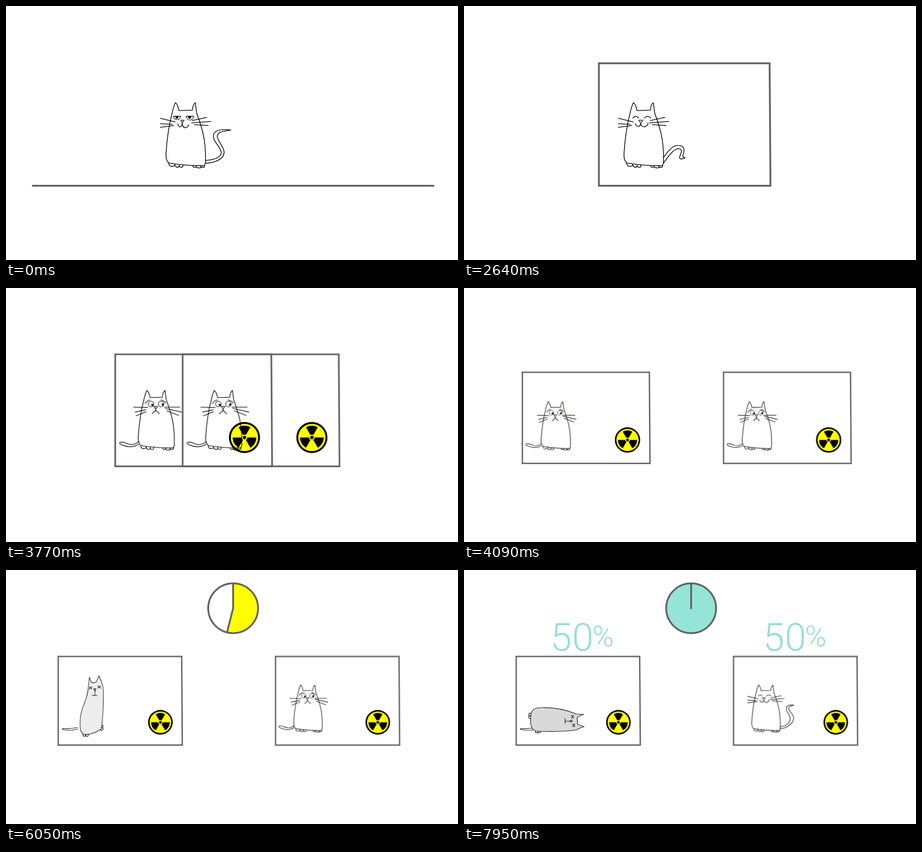
Animation of 997x561 px, one loop 8000 ms. Source, as an HTML page:

```html
<!DOCTYPE html>
<html lang="en">
<head>
<meta charset="utf-8">
<title>Cat in a box</title>
<style>
html, body { margin: 0; height: 100%; overflow: hidden; background: #fff; }
svg { display: block; width: 100%; height: 100%; }
svg * { animation: 0s linear infinite; animation-duration: 8s; }
svg { fill: none; stroke: #000; stroke-width: 1.6; stroke-linecap: round; stroke-linejoin: round; }
.frame { stroke: #636363; stroke-width: 4; }
.nose { fill: #f69cab; stroke-width: 1.1; }
.eye { fill: #ffffe0; stroke-width: 1.2; }
.dot { fill: #000; stroke: none; }
.lit { fill: #ff0; stroke: none; }

/* box */
.arm-l { transform-origin: 297.5px 397px; animation-name: arm-l; }
.arm-r { transform-origin: 676px 397px; animation-name: arm-r; }
.lid { transform-origin: 297.5px 126.5px; animation-name: lid; }
@keyframes arm-l { 0%, 5.3% { transform: rotate(0deg) scaleX(1); } 8.5%, to { transform: rotate(90deg) scaleX(1.134); } }
@keyframes arm-r { 0%, 5.3% { transform: rotate(0deg) scaleX(1); } 8.5%, to { transform: rotate(-90.4deg) scaleX(1.013); } }
@keyframes lid {
  0%, 15.3% { transform: rotate(-157deg) scaleX(0); }
  17% { transform: rotate(-150deg) scaleX(1); }
  25.6% { transform: rotate(-5deg) scaleX(1); }
  26.3%, to { transform: rotate(0deg) scaleX(1); }
}

/* one world becomes two */
.left { animation-name: go-left; }
.right { animation-name: go-right, late; animation-timing-function: linear, step-end; }
@keyframes go-left {
  0%, 43.75% { transform: translate(0, 0) scale(1); animation-timing-function: cubic-bezier(.37, 0, .63, 1); }
  52.73%, to { transform: translate(-99.9px, 99.6px) scale(.723); }
}
@keyframes go-right {
  0%, 43.75% { transform: translate(0, 0) scale(1); animation-timing-function: cubic-bezier(.37, 0, .63, 1); }
  52.73%, to { transform: translate(379.5px, 99.6px) scale(.723); }
}
@keyframes late { 0% { opacity: 0; } 43.75%, to { opacity: 1; } }

/* moods */
.smug, .happy, .calm, .worried, .left .cat, .dead { animation-timing-function: step-end; }
.smug { animation-name: smug; }
.happy { animation-name: happy; }
.calm { animation-name: calm; }
.worried { animation-name: worried; }
.left .cat { animation-name: alive; }
.dead { animation-name: dead; }
.left .body { animation-name: pale; }
@keyframes smug { 0% { opacity: 1; } 15.4%, to { opacity: 0; } }
@keyframes happy { 0% { opacity: 0; } 15.4%, to { opacity: 1; } }
@keyframes calm { 0% { opacity: 1; } 36.25% { opacity: 0; } 91.4%, to { opacity: 1; } }
@keyframes worried { 0% { opacity: 0; } 36.25% { opacity: 1; } 91.4%, to { opacity: 0; } }
@keyframes alive { 0% { opacity: 1; } 75%, to { opacity: 0; } }
@keyframes dead { 0% { opacity: 0; } 75%, to { opacity: 1; } }
@keyframes pale { 0%, 67.5% { fill: #fff0; } 75%, to { fill: #eee; } }

.tail { animation-name: wag; animation-timing-function: ease-in-out; }
@keyframes wag {
  0%, 15.4%, 26.7%, 95.5% { d: path("M440 341C465 340 480 330 473 318C468 305 455 298 458 283C463 272 480 272 496 274C480 277 468 277 466 287C466 298 480 310 481 322C482 338 460 347 440 347"); }
  20.5%, 33%, 91.4% { d: path("M440 335C450 320 462 307 472 308C486 308 487 316 484 326C481 334 484 335 488 335C478 340 474 338 476 332C482 318 480 315 472 315C462 316 450 333 440 347"); }
  99.4%, to { d: path("M440 341C459 339 471 328 470 313C468 300 456 295 459 282C461 274 471 274 481 275C470 278 464 281 466 288C470 297 481 303 481 315C479 333 459 346 440 347"); }
}

/* hazard sign and its rays */
.sign { transform-origin: 609.3px 327.4px; animation-name: sign; }
@keyframes sign { 0%, 36.25% { transform: scale(0); } 38.7% { transform: scale(1.1); } 39.6%, to { transform: scale(1); } }
.rays { stroke-width: 2; transform-origin: 243px 321px; animation-name: rays; }
@keyframes rays {
  0%, 58.7% { transform: translateX(72px) scale(.4); opacity: 0; }
  58.75% { transform: translateX(72px) scale(.4); opacity: 1; }
  66.5% { transform: translateX(0) scale(1); opacity: 1; }
  67.5% { transform: translateX(-9px) scale(1.1); opacity: 1; }
  67.6%, to { transform: translateX(-9px) scale(1.1); opacity: 0; }
}

/* falling */
.fall { transform-origin: 205px 332px; animation-name: fall; }
.corpse { animation-name: corpse; }
.face { animation-name: face; }
@keyframes fall {
  0%, 75% { transform: translate(-18px, -27px) rotate(-90deg); animation-timing-function: ease-in; }
  81.5%, to { transform: translate(0, 0) rotate(0deg); }
}
@keyframes corpse {
  0%, 75% { fill: #eee; d: path("M160 356C152 346 147 332 147 320C148 308 165 309 180 309C205 309 225 325 252 325L273.5 327Q264 330 261 333L263 342L277 348Q266 353 255 357C225 361 190 359 160 356Z"); }
  84.1% { fill: #e0e0e0; d: path("M160 356C152 346 147 332 147 320C148 308 165 309 180 309C205 309 225 325 252 325L273.5 327Q264 330 261 333L263 342L277 348Q266 353 255 357C225 361 190 359 160 356Z"); animation-timing-function: ease-out; }
  99.4%, to { fill: #d9d9d9; d: path("M160 356C148 354 146 340 147 325C148 308 155 304 172 304C200 303 225 309 248 318L264.5 319Q255 321 249.5 326L250.5 341L265 346Q256 348 248 353C225 357 190 357 160 356Z"); }
}
@keyframes face {
  0%, 84.1% { transform: translate(10.5px, 6px); animation-timing-function: ease-out; }
  99.4%, to { transform: translate(0, 0); }
}

/* clock and odds */
.clock { stroke: #636363; stroke-width: 4; animation-name: clock; }
.pie { stroke: #ff0; stroke-width: 54; stroke-linecap: butt; stroke-dasharray: 360; animation-name: pie, ripe; animation-timing-function: linear, step-end; }
.hand { transform-origin: 501px 84.5px; animation-name: hand; }
@keyframes clock { 0%, 52.5% { opacity: 0; } 55%, to { opacity: 1; } }
@keyframes pie { 0%, 57.19% { stroke-dashoffset: 360; } 91.39%, to { stroke-dashoffset: 0; } }
@keyframes ripe { 0% { stroke: #ff0; } 91.39%, to { stroke: #94e4d7; } }
@keyframes hand { 0%, 57.19% { transform: rotate(0deg); } 91.39%, to { transform: rotate(360deg); } }
.odds { font: 300 85px Roboto, sans-serif; text-anchor: middle; fill: #94e0d2; stroke: none; transform-origin: 262px 148px; animation-name: odds; }
.odds .percent { font-size: 64px; }
@keyframes odds { 0%, 91.5% { transform: scale(0); } 95% { transform: scale(1.2); } 97.5%, to { transform: scale(1); } }
</style>
</head>
<body>
<svg viewBox="0 0 997 561" preserveAspectRatio="none">
  <g class="left">
    <g class="frame">
      <path d="M297.5 397H676"/>
      <path class="arm-l" d="M297.5 397H59"/>
      <path class="arm-r" d="M676 397H943"/>
      <path class="lid" d="M297.5 126.5H674"/>
    </g>
    <g class="sign">
      <circle class="dot" cx="609.3" cy="327.4" r="37.6"/>
      <circle class="lit" cx="609.3" cy="327.4" r="33"/>
      <g class="blades" transform="translate(609.3 327.4)"></g>
      <circle class="dot" cx="609.3" cy="327.4" r="4.2"/>
    </g>
    <g class="cat">
      <path class="body" d="M373.5 213.5Q379 217 381.5 231L411 230Q412 218 417.5 213.5Q419 224 420.5 236C431 266 441 292 440 340Q440.5 350 437 352.5C412 353 385 351 360 347Q352 343 353 325C355 295 359 265 366 238Q369 224 373.5 213.5Z"/>
      <path d="M359 347Q359 355 367 354Q372 354 372 350M372.5 351Q374 357 380 356Q383 354 382 351M382 354Q386 358 390 355V351M412 353Q413 358 419 356V353M419 355Q423 359 430 357V353M430 355Q434 358 438 355V351"/>
      <g class="calm">
        <path class="tail" d="M440 341"/>
        <path d="M340.5 248L373 256M340.5 260L367 261.5M340.5 268L370 264M411 253L443 246M409.5 258L452 255M415 262L446 264"/>
        <g class="smug">
          <path class="eye" d="M369.5 243.5H385Q384 251 377 251Q370 250 369.5 243.5ZM397.5 243.5H414Q413 252 405 252Q399 251 397.5 243.5Z"/>
          <path class="dot" d="M373.5 243.5H380.5Q380 249 377 249Q374 249 373.5 243.5ZM401.5 243.5H408.5Q408 249 405 249Q402 249 401.5 243.5Z"/>
          <path d="M369.5 243.5H385M397.5 243.5H414"/>
          <path class="nose" d="M385 252H393L389 259.5Z"/>
          <path d="M379 260Q380 267 384 267Q388 266 388.5 260Q390 269 396 269Q402 268 402.5 262"/>
        </g>
        <g class="happy">
          <path d="M372.5 247.5Q378 240 385 247.5M398 247.5Q405 240 412 247.5"/>
          <path class="nose" d="M385 252H395L390 260Z"/>
          <path d="M378 259Q379 266 384 266Q389 265 390 260Q391 267 398 267Q406 265 406 258"/>
        </g>
      </g>
      <g class="worried">
        <path d="M354.5 337C346 345 335 346 326 342Q312 336 308 340Q308 344 316 346C330 352 344 350 354 344"/>
        <path d="M341 254L376 255M345.5 266L371 260.5M347.5 275L372 265M416.5 254H453.5M418.5 257L457 266M422 263L450.5 274M369.5 245Q374 238 381.5 236.5M407.5 236.5Q415 238 419.5 244"/>
        <circle class="eye" cx="383.7" cy="246.5" r="6.8"/>
        <circle class="eye" cx="408" cy="246.5" r="6.8"/>
        <circle class="dot" cx="387" cy="248.5" r="2.6"/>
        <circle class="dot" cx="412" cy="247.8" r="2.6"/>
        <path class="nose" d="M390 252H400L395 259.5Z"/>
        <path d="M395 259.5V261.5L386.5 270M395 261.5L404 270"/>
      </g>
    </g>
  </g>
  <g class="right"></g>

  <g class="rays">
    <path stroke="#808000" d="M243.5 292Q231 320 241 349"/>
    <path stroke="#ff0" d="M248 307Q239 322 247 339"/>
  </g>

  <g class="dead" stroke-width="1.2">
    <path d="M158 347.5Q144 351 124 350.5Q126 354 140 354Q150 354 158 351"/>
    <g class="fall">
      <circle cx="145.5" cy="319" r="2.8"/>
      <circle cx="145.5" cy="325" r="2.8"/>
      <circle cx="160" cy="357" r="2.8"/>
      <circle cx="166" cy="357" r="2.8"/>
      <path class="corpse" d="M160 356"/>
      <g class="face">
        <path d="M237 321L242 327M242 321L237 327M239.5 340L244.5 346M244.5 340L239.5 346M223 328V339M223 334H233"/>
        <path class="nose" d="M238 331V336L232.5 334Z"/>
      </g>
    </g>
  </g>

  <g class="clock">
    <circle class="pie" cx="501" cy="84.5" r="27" pathLength="360" transform="rotate(-90 501 84.5)"/>
    <circle cx="501" cy="84.5" r="55"/>
    <path d="M501 84.5V31"/>
    <path class="hand" d="M501 84.5V31"/>
  </g>
  <g class="pair">
    <text class="odds" y="177.5"><tspan x="214">5</tspan><tspan x="262">0</tspan><tspan class="percent" x="307" y="169">%</tspan></text>
  </g>
  <g class="pair" transform="translate(469 0)"></g>
</svg>
<script>
const pick = selector => document.querySelector(selector);
const copyInto = (from, to) => to.append(...from.cloneNode(true).children);

pick('.blades').innerHTML = [0, 120, 240].map(turn =>
  `<path class="dot" transform="rotate(${turn})" d="M-3.5 -6L-14.2 -24.7A28.5 28.5 0 0 1 14.2 -24.7L3.5 -6A7 7 0 0 0 -3.5 -6Z"/>`).join('');

copyInto(pick('.left'), pick('.right'));
const [first, second] = document.querySelectorAll('.pair');
copyInto(first, second);
</script>
</body>
</html>
```
